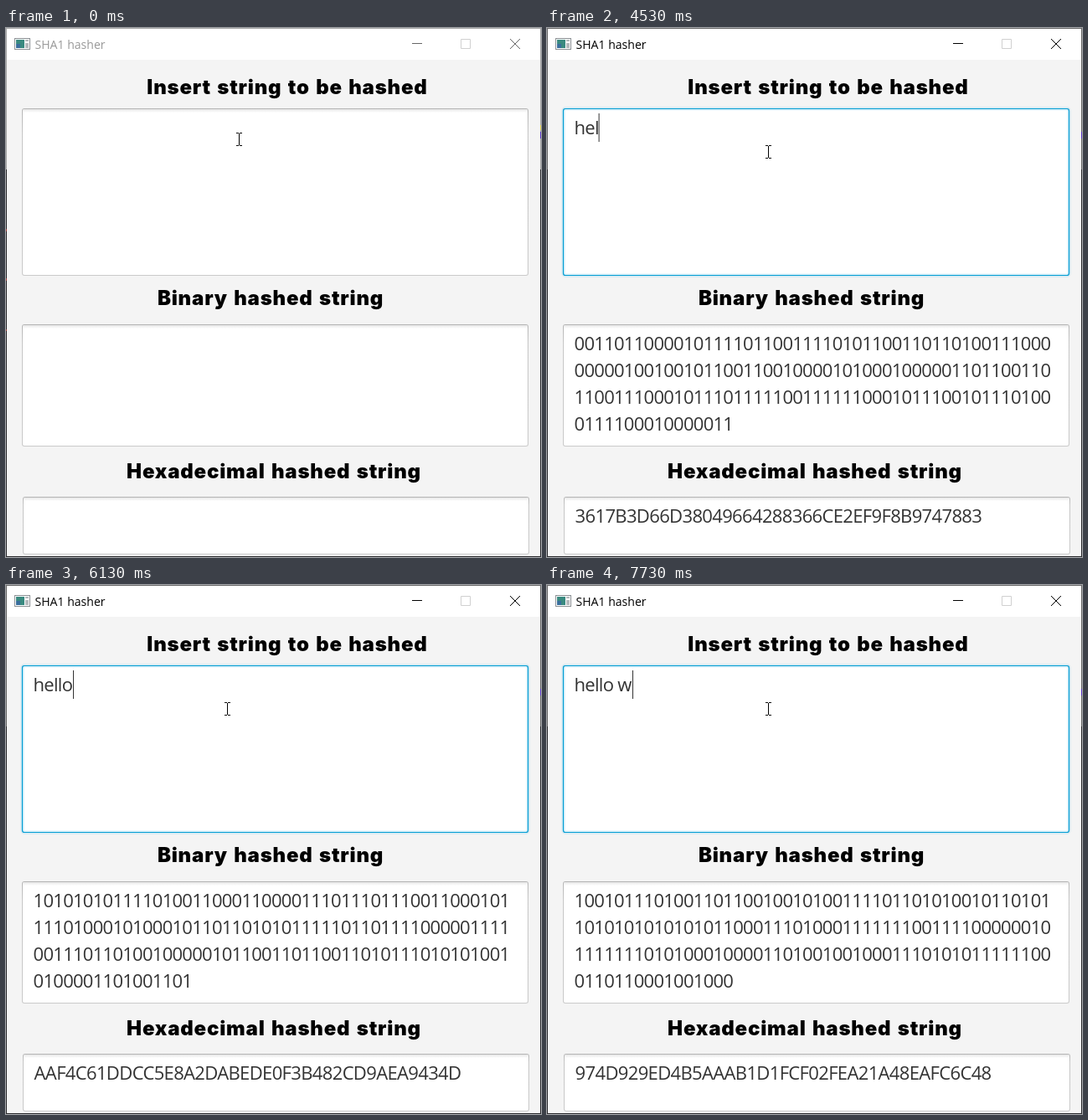
An HTML page for the animation above (8000 ms loop, 639 px wide and 632 px high).

```html
<!DOCTYPE html>
<html lang="en">
<head>
<meta charset="utf-8">
<title>SHA1 hasher</title>
<style>
  html, body { margin: 0; width: 100%; height: 100%; overflow: hidden; background: #f4f4f4; }
  svg { display: block; width: 639px; height: 632px; }
  text { font-family: "Open Sans", "Noto Sans", sans-serif; white-space: pre; }
  .head { font: 900 24px Inter, "Open Sans", sans-serif; letter-spacing: .8px; word-spacing: 1.8px; text-anchor: middle; }
  .body { font-size: 22px; letter-spacing: -.73px; fill: #333; }
  .hex { letter-spacing: -.65px; }
  .title { font-size: 14.05px; fill: #999; }
  .edge { fill: #aaa; }
  .ctrl { fill: none; stroke: #666; }
  .focus { display: none; }
  .active .title { fill: #000; }
  .active .edge { fill: #6b6b6b; }
  .active .ctrl { stroke: #000; }
  .active .focus { display: inline; }
  .active .behind { display: none; }
</style>
</head>
<body>
<svg id="win" viewBox="0 0 639 632">
  <defs>
    <linearGradient id="rim" x2="0" y2="1">
      <stop stop-color="#b4b4b4"/><stop offset=".15" stop-color="#c6c6c6"/><stop offset="1" stop-color="#cacaca"/>
    </linearGradient>
    <linearGradient id="shade" x2="0" y2="1">
      <stop stop-color="#e6e6e6"/><stop offset="1" stop-color="#fff"/>
    </linearGradient>
  </defs>

  <rect width="639" height="632" fill="#f4f4f4"/>
  <rect width="639" height="38" fill="#fff"/>
  <g shape-rendering="crispEdges">
    <path class="edge" d="M0 0H639V1H0zM0 1H1V169H0zM638 1H639V169H638z"/>
    <path fill="#2d2d30" d="M0 169H1V631H639V632H0zM638 169H639V632H638z"/>
    <path fill="#5a36c8" d="M638 124H639V132H638z"/>
    <path class="behind" fill="#e3d24a" d="M638 116H639V122H638z"/>
    <path class="behind" fill="#a03a3a" d="M0 240H1V243H0zM0 299H1V302H0zM0 360H1V362H0z"/>
  </g>

  <g shape-rendering="crispEdges">
    <rect x="10.5" y="12.5" width="18" height="13" fill="#fff" stroke="#8b9094"/>
    <rect x="12" y="14" width="10" height="10" fill="#3a8a80"/>
    <rect x="12" y="19" width="5" height="5" fill="#3a6f9c"/>
    <path fill="#b5babd" d="M23 14H27V16H23zM23 18H27V24H23z"/>
  </g>
  <text class="title" x="34.5" y="25">SHA1 hasher</text>
  <path class="ctrl" d="M485 18.5H497"/>
  <path fill="none" stroke="#d0d0d0" d="M543.5 13.5H554.5V24.5H543.5z"/>
  <path class="ctrl" d="M602 13L614 25M614 13L602 25"/>

  <text class="head" x="336" y="79">Insert string to be hashed</text>
  <text class="head" x="316" y="331">Binary hashed string</text>
  <text class="head" x="320" y="538">Hexadecimal hashed string</text>

  <g id="boxes"></g>
  <g class="focus">
    <rect x="19.5" y="96.5" width="604" height="199" rx="2.5" fill="#fff" stroke="#039ed3" stroke-width="1.2"/>
    <rect x="19.5" y="96.5" width="604" height="199" rx="2.5" fill="none" stroke="#039ed3" stroke-opacity=".13" stroke-width="4.5"/>
  </g>

  <text class="body" id="input" x="32.6" y="127"></text>
  <rect id="caret" y="102" width="1" height="34" fill="#333"/>
  <g id="bits"></g>
  <text class="body hex" id="hex" x="33.6" y="591"></text>
  <path id="mouse" fill="none" stroke="#000" shape-rendering="crispEdges"
        d="M-3 -7.5H0M1 -7.5H4M.5 -7V7M-3 7.5H0M1 7.5H4"/>
</svg>
<script>
const $ = id => document.getElementById(id);
const LOOP = 8000, LINE = 48;

// time, typed text, caret x (0 = hidden), pointer x, pointer y
const steps = [
  [0, "", 0, 278, 133],
  [70, "", 0, 270, 141],
  [130, "", 0, 264, 147],
  [4470, "he", 0, 264, 148],
  [4530, "hel", 61.6, 264, 148],
  [5200, "hel", 0, 264, 148],
  [5530, "hell", 67, 264, 148],
  [6000, "hell", 0, 264, 148],
  [6130, "hello", 80, 264, 148],
  [6600, "hello", 0, 264, 148],
  [7130, "hello", 80, 264, 148],
  [7400, "hello ", 86, 264, 148],
  [7730, "hello w", 102, 264, 148]
];

// SHA-1 of a short ASCII string (one block)
function sha1(s) {
  const rol = (x, n) => x << n | x >>> (32 - n);
  const k = [0x5a827999, 0x6ed9eba1, 0x8f1bbcdc, 0xca62c1d6];
  const init = [0x67452301, 0xefcdab89, 0x98badcfe, 0x10325476, 0xc3d2e1f0];
  const w = Array(16).fill(0);
  [...s, "\x80"].forEach((ch, i) => w[i >> 2] |= ch.charCodeAt(0) << (24 - i % 4 * 8));
  w[15] = s.length * 8;
  let [a, b, c, d, e] = init;
  for (let i = 0; i < 80; i++) {
    if (i > 15) w[i] = rol(w[i - 3] ^ w[i - 8] ^ w[i - 14] ^ w[i - 16], 1);
    const q = Math.floor(i / 20);
    const f = q === 0 ? b & c | ~b & d : q === 2 ? b & c | b & d | c & d : b ^ c ^ d;
    const next = rol(a, 5) + f + e + k[q] + w[i] | 0;
    [a, b, c, d, e] = [next, a, rol(b, 30), c, d];
  }
  const sum = [a, b, c, d, e];
  return init.map((v, i) => (v + sum[i] >>> 0).toString(16).padStart(8, "0")).join("").toUpperCase();
}

const toBits = hex => [...hex].map(d => parseInt(d, 16).toString(2).padStart(4, "0")).join("");

const box = (x, y, w, h) => `
  <rect x="${x}" y="${y}" width="${w}" height="${h}" rx="3" fill="url(#rim)"/>
  <rect x="${x + 1}" y="${y + 1}" width="${w - 2}" height="${h - 2}" rx="2" fill="#fff"/>
  <rect x="${x + 1}" y="${y + 1}" width="${w - 2}" height="4" rx="2" fill="url(#shade)"/>`;

$("boxes").innerHTML = box(19, 96, 605, 200) + box(19, 354, 605, 146) + box(20, 560, 605, 69);
$("bits").innerHTML = [385, 417, 449, 481].map(y => `<text class="body" x="32.6" y="${y}"></text>`).join("");
const rows = [...$("bits").children];

let shown;
function show(step) {
  if (step === shown) return;
  shown = step;
  const [, typed, caret, x, y] = step;
  const hex = typed && sha1(typed), bits = toBits(hex);
  $("win").classList.toggle("active", typed !== "");
  $("input").textContent = typed;
  $("hex").textContent = hex;
  rows.forEach((row, i) => row.textContent = bits.slice(i * LINE, (i + 1) * LINE));
  $("caret").setAttribute("x", caret);
  $("caret").setAttribute("visibility", caret ? "visible" : "hidden");
  $("mouse").setAttribute("transform", `translate(${x} ${y})`);
}

const start = performance.now();
function tick() {
  const t = (performance.now() - start) % LOOP;
  show(steps.filter(s => s[0] <= t).pop());
  requestAnimationFrame(tick);
}
tick();
</script>
</body>
</html>
```
